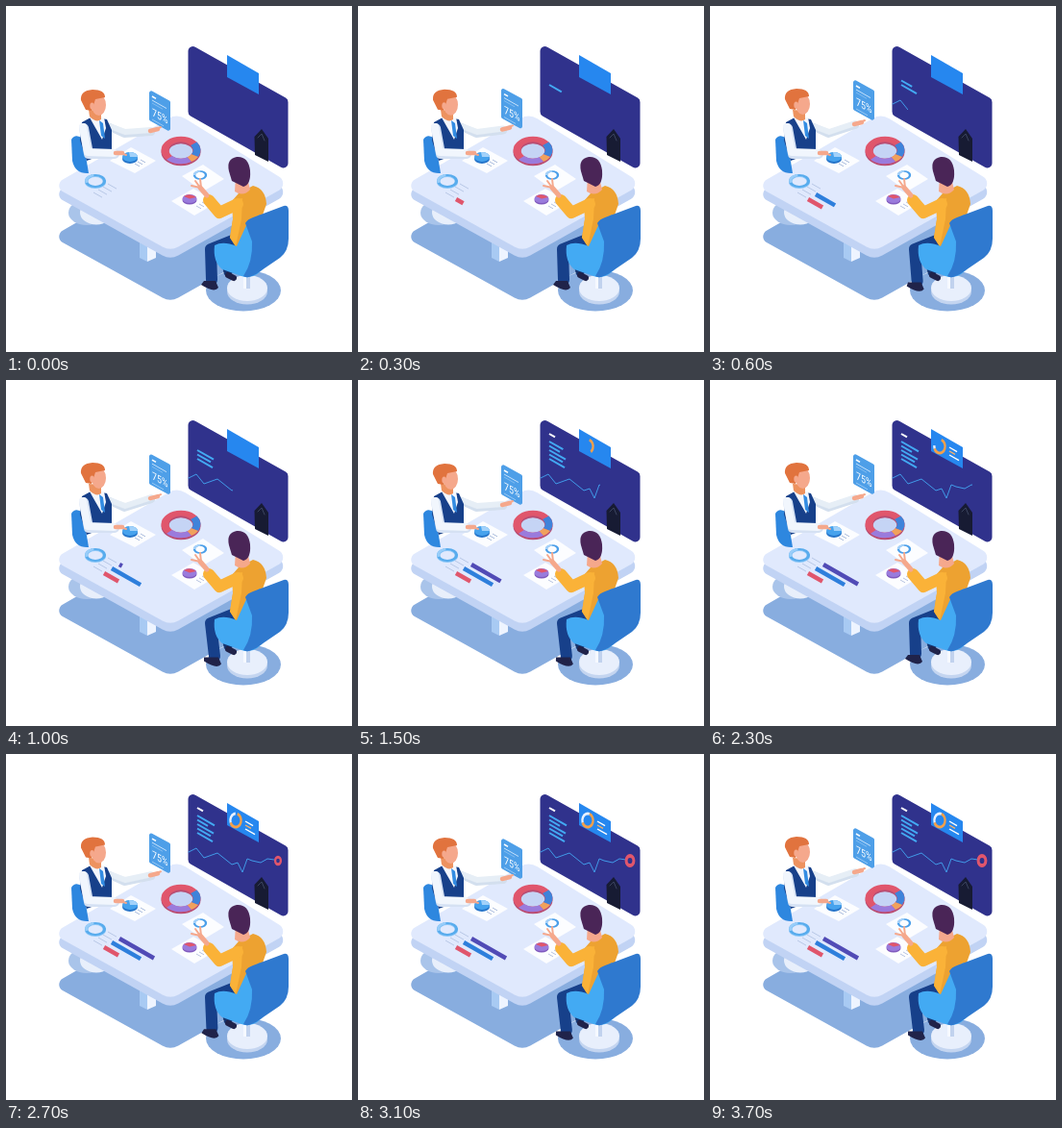
An HTML page with a canvas for the animation above (3.8 s loop, 360 by 360 pixels).

```html
<!DOCTYPE html>
<html lang="en">
<head>
<meta charset="utf-8">
<title>Team meeting</title>
<style>
html, body { margin: 0; width: 100%; height: 100%; overflow: hidden; background: #fff; }
canvas { display: block; width: 100vw; height: 100vh; }
</style>
</head>
<body>
<canvas id="stage"></canvas>
<script>
const LOOP = 3800, STEP = 100, SIZE = 360;
const canvas = document.getElementById('stage');
const ctx = canvas.getContext('2d');
const dpr = window.devicePixelRatio || 1;
canvas.width = canvas.height = SIZE * dpr;

const NAVY = '#17408a', SKIN = '#f5a88c', WHITE = '#fff', RED = '#e0566c';
const BLUE = '#2f79cf', SKY = '#43aaf3', PURPLE = '#9a7bdc', SHADE = '#88addf';

const clamp = v => Math.max(0, Math.min(1, v));
const ramp = (t, a, b) => clamp((t - a) / (b - a));
// Swings between 0 and 1, resting briefly at both ends.
const swing = (t, period) => clamp(0.5 - 0.8 * Math.cos(2 * Math.PI * t / period));

// Linear interpolation over [time, value] pairs.
function track(t, keys) {
  for (let i = 1; i < keys.length; i++) {
    const [a, u] = keys[i - 1], [b, v] = keys[i];
    if (t < b) return u + (v - u) * ramp(t, a, b);
  }
  return keys[keys.length - 1][1];
}

function shape(d, color) {
  ctx.fillStyle = color;
  ctx.fill(new Path2D(d));
}

function stroke(d, color, width = 1) {
  ctx.strokeStyle = color;
  ctx.lineWidth = width;
  ctx.lineCap = ctx.lineJoin = 'round';
  ctx.stroke(new Path2D(d));
}

function oval(x, y, rx, ry, color, turn = 0) {
  ctx.fillStyle = color;
  ctx.beginPath();
  ctx.ellipse(x, y, rx, ry, turn, 0, 7);
  ctx.fill();
}

// Flattened ring segment; from and to are in turns.
function arc(x, y, rx, ry, width, color, from = 0, to = 1) {
  ctx.save();
  ctx.translate(x, y);
  ctx.scale(1, ry / rx);
  ctx.beginPath();
  ctx.arc(0, 0, rx, from * 2 * Math.PI, to * 2 * Math.PI);
  ctx.strokeStyle = color;
  ctx.lineWidth = width;
  ctx.lineCap = 'butt';
  ctx.stroke();
  ctx.restore();
}

// Each point is [x, y] or [x, y, radius].
function rounded(points, r, color) {
  const n = points.length, [ax, ay] = points[0], [bx, by] = points[n - 1];
  ctx.beginPath();
  ctx.moveTo((ax + bx) / 2, (ay + by) / 2);
  points.forEach(([x, y, own = r], i) => {
    const [nx, ny] = i < n - 1 ? points[i + 1] : [(ax + bx) / 2, (ay + by) / 2];
    ctx.arcTo(x, y, nx, ny, own);
  });
  ctx.closePath();
  ctx.fillStyle = color;
  ctx.fill();
}

// Line running down to the right along the isometric axis.
function dash(x, y, length, color, width = 1, slope = 0.57) {
  ctx.strokeStyle = color;
  ctx.lineWidth = width;
  ctx.lineCap = 'butt';
  ctx.beginPath();
  ctx.moveTo(x, y);
  ctx.lineTo(x + length, y + length * slope);
  ctx.stroke();
}

function tabletop(dy, color) {
  rounded([[48, 187 + dy, 7], [178, 112 + dy], [296, 185 + dy, 8], [171, 255 + dy]], 17, color);
}

function drawScreen(t) {
  rounded([[189.5, 38.5], [293.5, 97], [293.5, 172], [189.5, 113]], 5, '#30328c');

  [16, 14, 17, 11, 18].forEach((len, i) => {
    const p = ramp(t, 100 + i * 300, 350 + i * 300);
    if (p) dash(199, 82 - i * 4.5, len * p, SKY, 2);
  });
  if (t >= 1500) dash(199, 56, 6, WHITE, 2);

  const reach = track(t, [[350, 189], [600, 206], [1000, 236], [1500, 252], [2300, 273], [2700, 284]]);
  ctx.save();
  ctx.beginPath();
  ctx.rect(189, 80, reach - 189, 60);
  ctx.clip();
  stroke('M190 102L198 98L206 108L220 103L235 115L241 113L246 123L251 109L256 111L265 113L272 109L279 110', '#419be9', 1);
  ctx.restore();

  const dot = ramp(t, 2400, 2800);
  if (dot) arc(283, 111, 3.9 * dot, 5 * dot, 3 * dot, RED);

  shape('M230 51L263 70V92L230 74Z', '#2687ef');
  const turn = track(t, [[1000, 0], [1500, 0.35], [2300, 0.72], [2800, 1]]);
  if (turn) {
    arc(239, 69, 5.6, 7, 2.4, '#f6a04a', -0.2, -0.2 + Math.min(turn, 0.65));
    if (turn > 0.65) arc(239, 69, 5.6, 7, 2.4, '#e8f1ff', 0.45, -0.2 + turn);
  }
  [8, 6, 10].forEach((len, i) => {
    const p = ramp(t, 1600 + i * 200, 1900 + i * 200);
    if (p) dash(249, 70 + i * 4, len * p, i === 1 ? '#f6b069' : WHITE, 1.4);
  });

  shape('M258.5 136L266 128L273 138V162L259 155Z', '#171b33');
  stroke('M262 137L266 133L269 140', '#3c4560', 1);
}

function drawPapers() {
  shape('M108 161L130 147L156 161L134 174Z', '#fcfdff');
  oval(129, 159, 8, 5, '#2574c9');
  oval(129, 157, 8, 5, '#46a2ed');
  shape('M129 157L128 152Q136 152 137 157Z', '#a3d2fa');
  [0, 1, 2].forEach(i => dash(134 + i * 3, 164 - i * 2, 5, '#a0b4d9', 0.9));

  shape('M183 177L205 165L227 180L205 193Z', '#fcfdff');
  arc(202, 176, 6, 4, 2.4, '#4b9fe9');
  arc(202, 176, 6, 4, 2.4, '#a8d3fa', 0.5, 0.75);

  shape('M172 203L195 190L220 204L196 218Z', '#fcfdff');
  oval(191, 202, 7.5, 4.6, '#7f59bd');
  oval(191, 200.5, 7.5, 4.6, PURPLE);
  shape('M191 200.5L185 198Q191 194 198 199Z', RED);
  [0, 1, 2].forEach(i => dash(198 + i * 3, 208 - i * 2, 5, '#a7b7da', 0.8));
}

function drawTable(t) {
  tabletop(9, '#c1d3f4');
  tabletop(0, '#e0e9fd');

  arc(93, 183, 9.5, 6, 3.2, '#8bc6f7');
  arc(93, 182, 9.5, 6, 3.2, '#58aced');
  arc(93, 182, 9.5, 6, 3.2, '#98cdf9', 0.45, 0.72);
  [0, 1, 2, 3].forEach(i => dash(91 + i * 5, 194 - i * 3, 9, '#aebfe0', 0.8));

  const bars = [
    [102, 201, 15, RED, 150, 450],
    [110, 196, 30, '#2e7fdc', 300, 750],
    [118, 192, 36, '#514bb6', 950, 1600]
  ];
  for (const [x, y, len, color, a, b] of bars) {
    const p = ramp(t, a, b);
    if (p) dash(x, y, len * p, color, 4.5);
  }

  drawPapers();

  oval(182, 151, 14, 10, '#c5d4f5');
  const ring = (y, color, from, to) => arc(182, y, 16.5, 11.5, 8, color, from, to);
  ring(152, '#b94d72');
  ring(150, RED);
  ring(150, '#3f83da', -0.1, 0.08);
  ring(150, '#f0a15c', 0.08, 0.16);
  ring(150, PURPLE, 0.16, 0.38);
}

function drawTablet(y) {
  ctx.save();
  ctx.translate(149, 88 + y);
  rounded([[0, -1], [22, 11], [22, 43], [0, 31]], 2, '#4e9fe8');
  dash(3, 6, 4, WHITE, 1.5);
  dash(3, 10, 15, '#c3e0fb', 1);
  dash(3, 13, 11, '#8dc2f2', 0.8);
  dash(3, 30, 12, '#a6d1f7', 0.8);
  ctx.transform(0.8, 0.43, 0, 1, 3, 26);
  ctx.fillStyle = WHITE;
  ctx.font = '11px Roboto, Arial, sans-serif';
  ctx.fillText('75%', 0, 0);
  ctx.restore();
}

function drawMan(lift) {
  const hand = -7 * lift, nod = -lift;
  shape('M68 139Q72 132 80 138L86 174Q72 175 69 161Z', '#2e87df');
  stroke(`M108 126L123 133L151 ${131 + hand}`, '#d3dfee', 8);
  stroke(`M108 125L124 131L151 ${129 + hand}`, '#e6eef6', 6);
  drawTablet(-11 * lift);
  stroke(`M150 ${130 + hand}L158 ${128 + hand}`, SKIN, 4.5);
  stroke(`M156 ${128 + hand}L161 ${126 + hand}`, SKIN, 2);

  shape('M79 121L90 115L105 118L110 129V151L84 161L77 140Z', NAVY);
  shape('M87 116L102 116L104 127L100 139Z', '#f4f7fd');
  shape('M97 119L101 122L103 138L99 135Z', '#338ce2');
  shape('M86 108L99 109V118Q94 122 87 115Z', '#ed925f');
  oval(96.5, 103 + nod, 7.5, 11, SKIN);
  shape(`M78 ${98 + nod}Q77 ${88 + nod} 90 ${87 + nod}Q103 ${87 + nod} 103 ${95 + nod}L93 ${97 + nod}L89 ${109 + nod}L83 ${108 + nod}Z`, '#e1733e');
  oval(89.5, 104 + nod, 2.2, 3.5, SKIN);

  stroke('M81 127L86 154L113 154', '#d5e1f3', 10);
  stroke('M80 126L85 152L112 153', '#f1f6fd', 8);
  stroke('M114 153L121 153', SKIN, 4.5);
  stroke('M119 153L125 155', SKIN, 2);
}

function drawWoman(t) {
  const tap = swing(t, 2300);
  const dx = 3 * tap, dy = 2.5 * tap;

  oval(247, 296, 39, 21.5, SHADE);
  oval(251, 297, 21, 13.5, '#c4d5f0');
  oval(251, 293.5, 21, 13.5, '#e8effc');
  shape('M247 274H254V294H247Z', '#c1d2ee');
  shape('M247 274H250V294H247Z', '#f6f9ff');

  // Far leg, then near leg.
  stroke('M239 244L226 254L231 277', '#163672', 9);
  stroke('M231 280L237 283', '#20234a', 6);
  stroke(`M238 243L213 253L${214 + dx} ${285 + dy}`, NAVY, 12);
  shape(`M206 ${286 + dy}L${218 + dx} ${286 + dy}L${221 + dx} ${293 + dy}Q${217 + dx} ${299 + dy} ${203 + dx} ${290 + dy}Z`, '#20234a');

  shape('M235 203L242 195L257 187Q270 190 271 206L258 243L240 252L233 241L236 222Z', '#eda231');
  shape('M236 202L246 200L245 222L239 250L233 241L236 222Z', '#fab238');
  stroke('M241 206L222 215L211 202', '#fab238', 12);
  stroke('M209 197L202 189', SKIN, 5);
  stroke('M202 189L193 187M202 189L197 182M203 189L202 180', SKIN, 2);

  shape('M239 178L251 179L254 191Q247 199 238 193Z', SKIN);
  shape('M232 172Q229 159 240 157Q252 156 254 171Q255 186 247 188L235 182Z', '#4a2557');

  shape('M217 249Q226 244 240 250L251 226L264 217L270 270Q259 286 245 281L225 274Q215 266 217 249Z', SKY);
  shape('M249 226Q251 222 257 220L289 208Q294 207 294 213V242Q294 255 285 262L260 279Q251 284 247 281Q257 266 256 245Z', BLUE);
}

function draw(t) {
  ctx.setTransform(dpr, 0, 0, dpr, 0, 0);
  ctx.fillStyle = WHITE;
  ctx.fillRect(0, 0, SIZE, SIZE);

  tabletop(53, SHADE);
  oval(84, 215, 19, 13, '#a9c4ea');
  oval(94, 215, 17, 12.5, '#e8effb');
  shape('M139 245H147V266L139 262Z', '#a8caf3');
  shape('M147 245H156V262L147 266Z', '#eef4ff');

  drawScreen(t);
  drawTable(t);
  drawMan(swing(t, 1550));
  drawWoman(t);
}

function tick() {
  const t = performance.now() % LOOP;
  draw(Math.floor(t / STEP) * STEP);
  requestAnimationFrame(tick);
}
tick();
</script>
</body>
</html>
```
